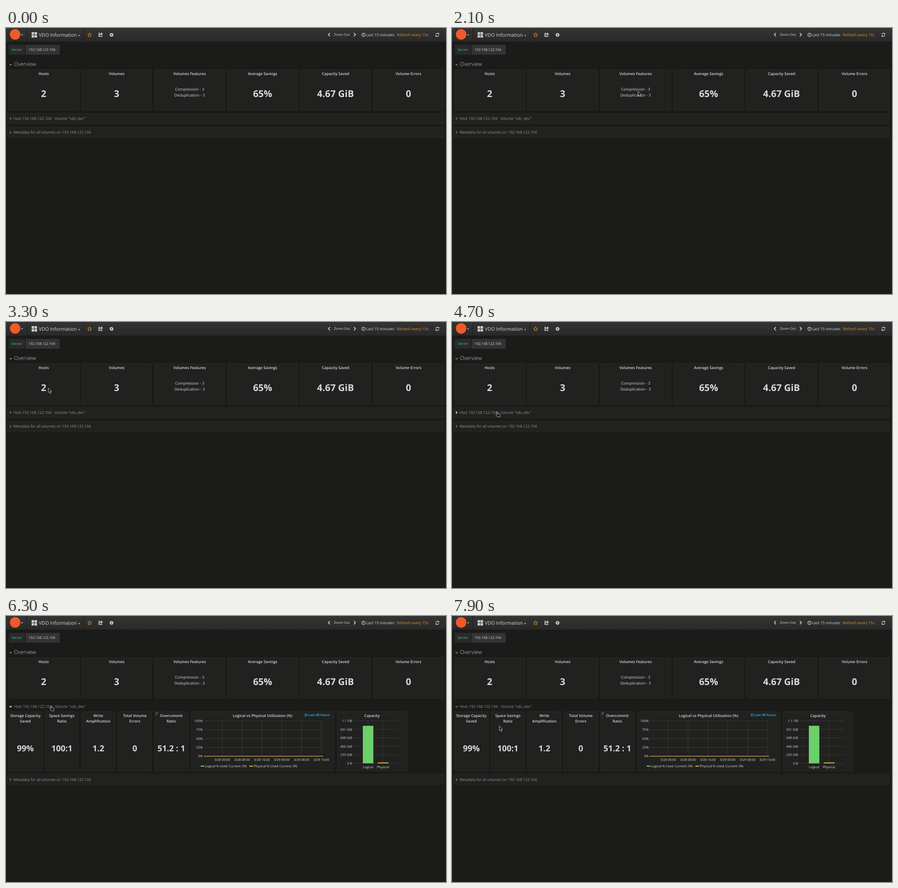
These frames come from a looping animation (963 px wide and 582 px high, 8 s). An HTML page:

```html
<!DOCTYPE html>
<html lang="en">
<head>
<meta charset="utf-8">
<title>VDO Information</title>
<style>
html, body { margin: 0; width: 100%; height: 100%; overflow: hidden; background: #1b1b1a; }
svg { display: block; width: 963px; height: 582px; }
text { font-family: "Open Sans", sans-serif; fill: #d8d9da; text-rendering: geometricPrecision; white-space: pre; }
.panel { fill: #212120; stroke: #2a2a29; }
.title { font-size: 8.26px; font-weight: 600; text-anchor: middle; }
.big { font-weight: 700; text-anchor: middle; }
.row { font-size: 8.35px; font-weight: 300; fill: #d0d0d0; }
.grid { fill: none; stroke: #444442; stroke-width: .7; }
.line { fill: none; stroke: #d8d9da; stroke-width: 1.3; }
.chev { fill: none; stroke: #999; stroke-width: 1.1; }
.cursor { fill: #1b1b1a; stroke: #dcdcdc; stroke-width: .8; stroke-linejoin: round; }

#closed, #opened, #detail, #meta, .hover, #arrow, #hand { animation: 8s step-end infinite; }
#closed { animation-name: closed; }
#opened { animation-name: opened; }
#detail { animation-name: detail; }
#meta { animation-name: meta; }
.hover { animation-name: hover; }
#arrow { animation-name: arrow; }
#hand { animation-name: hand; }
@keyframes closed { 0% { opacity: 1 } 77.5%, 100% { opacity: 0 } }
@keyframes opened { 0% { opacity: 0 } 77.5%, 100% { opacity: 1 } }
@keyframes detail { 0% { opacity: 0 } 78.75%, 100% { opacity: 1 } }
@keyframes meta {
  0% { transform: translateY(0) }
  77.5% { transform: translateY(129px) }
  78.75%, 100% { transform: translateY(129.7px) }
}
@keyframes hover {
  0% { stroke: #999; stroke-width: 1.1 }
  56.25% { stroke: #fff; stroke-width: 1.4 }
  92.5%, 100% { stroke: #999; stroke-width: 1.1 }
}
@keyframes hand {
  0% { opacity: 0; transform: translate(95px, 195px) }
  56.25% { opacity: 1; transform: translate(95px, 195px) }
  58.75% { opacity: 1; transform: translate(95.3px, 195.5px) }
  92.5%, 100% { opacity: 0; transform: translate(95px, 195px) }
}
@keyframes arrow {
  0% { transform: translate(-20px, -20px) }
  6.25% { transform: translate(8px, 11px) }
  7.5% { transform: translate(130px, 95px) }
  8.75% { transform: translate(238px, 169px) }
  11.25% { transform: translate(262px, 165px) }
  12.5% { transform: translate(330px, 150px) }
  13.75% { transform: translate(390px, 140px) }
  15% { transform: translate(406px, 138px) }
  18.75% { transform: translate(406.5px, 137.3px) }
  26.25% { transform: translate(406.5px, 138px) }
  27.5% { transform: translate(405px, 139.5px) }
  30% { transform: translate(393px, 141px) }
  31.25% { transform: translate(353px, 144.5px) }
  33.75% { transform: translate(290px, 152px) }
  35% { transform: translate(218px, 150px) }
  37.5% { transform: translate(150px, 146px) }
  38.75% { transform: translate(103px, 142px) }
  41.25% { transform: translate(92px, 144px) }
  43.75% { transform: translate(92.4px, 144.4px) }
  45% { transform: translate(92.6px, 144.4px) }
  47.5% { transform: translate(93px, 145px) }
  53.75% { transform: translate(93px, 152px) }
  55% { transform: translate(95px, 174px) }
  56.25% { transform: translate(-20px, -20px) }
  92.5% { transform: translate(101px, 213px) }
  93.75% { transform: translate(102px, 231px) }
  95% { transform: translate(103px, 239.6px) }
  98.75%, 100% { transform: translate(103px, 240px) }
}
</style>
</head>
<body>
<svg id="stage" viewBox="0 0 963 582">
  <defs>
    <linearGradient id="bar" x2="0" y2="1">
      <stop offset="0" stop-color="#343434"/><stop offset="1" stop-color="#292929"/>
    </linearGradient>
  </defs>

  <rect width="963" height="29" fill="url(#bar)"/>
  <path d="M0 29.5H963" stroke="#242423"/>
  <path d="M45.5 0V29M170.5 0V29" stroke="#1d1d1d"/>
  <circle cx="20" cy="14" r="11.5" fill="#f05a28"/>
  <path d="M33 14h4.400l-2.200 2.300zM157.800 15.800h4.400l-2.200 2.300zM108 46.800h3.800l-1.900 2z" fill="#d8d9da"/>
  <path d="M56 9h5.500v5.500h-5.500zM62.500 9h5.500v5.500h-5.500zM56 15.500h5.500v5.500h-5.500zM62.500 15.500h5.500v5.500h-5.500z" fill="#c8c8c8"/>
  <text x="71.800" y="18.900" font-size="10.5">VDO Information</text>
  <path id="star" fill="none" stroke="#eb9a2a"/>
  <path class="line" d="M206 11.500h-2.800v7h6.600v-2.500M205 16.500q0-3.500 4-3.500"/>
  <path d="M208 9.800l4 3.200-4 3.200z" fill="#d8d9da"/>
  <circle class="line" cx="231" cy="15" r="2.400" style="stroke-width:1.900"/>
  <circle class="line" cx="231" cy="15" r="3.800" style="stroke-width:1.200" stroke-dasharray="1.500 1.485"/>
  <path class="line" d="M709 11l-3.600 3.600 3.600 3.600M761.300 11l3.600 3.600-3.600 3.600" style="stroke-width:1.600"/>
  <text x="717.700" y="17.200" font-size="7.45">Zoom Out</text>
  <circle class="line" cx="782.300" cy="15" r="3.600" style="stroke-width:1.100"/>
  <path class="line" d="M782.600 12.700v2.600h-1.800" style="stroke-width:.8"/>
  <text x="788" y="18.100" font-size="8.43">Last 15 minutes</text>
  <text x="855.500" y="18.100" font-size="8.43" style="fill:#eb8f24">Refresh every 15s</text>
  <path class="line" d="M940.600 14.200a3.500 3.500 0 0 1 6-1.700M947.400 15.800a3.500 3.500 0 0 1-6 1.700"/>
  <path d="M948 10.800v3.300h-3.300zM940 19.200v-3.300h3.300z" fill="#d8d9da"/>

  <rect x="6" y="37" width="35.500" height="21.500" fill="#2a2a2a"/>
  <rect x="43" y="37" width="74.500" height="21.500" fill="#333"/>
  <text x="12.500" y="50.400" font-size="7.5" style="fill:#33c6b6">Server</text>
  <text x="49.500" y="50.400" font-size="7.6">192.168.122.104</text>

  <path class="chev" d="M7.700 79l2.500 2.500 2.500-2.500"/>
  <text x="17.500" y="82.700" font-size="11.7" font-weight="300">Overview</text>
  <g id="overview"></g>

  <g id="closed">
    <rect class="panel" x="3.500" y="187" width="954" height="22"/>
    <path class="chev hover" d="M8.500 195.500l2.500 2.600-2.500 2.600"/>
    <text class="row" x="16.300" y="201.100">Host 192.168.122.104 - Volume "vdo_dev"</text>
  </g>
  <g id="opened">
    <path class="chev hover" d="M7.700 197l2.500 2.500 2.500-2.500"/>
    <text class="row" x="17.300" y="200.500">Host 192.168.122.104 - Volume "vdo_dev"</text>
  </g>
  <g id="detail"></g>
  <g id="meta">
    <rect class="panel" x="3.500" y="217" width="954" height="22"/>
    <path class="chev" d="M8.500 225.700l2.500 2.600-2.500 2.600"/>
    <text class="row" x="16.300" y="231.300">Metadata for all volumes on 192.168.122.104</text>
  </g>

  <path id="arrow" class="cursor" d="M.5 .5V10.400L2.900 8.500 4.700 12.500 6.600 11.700 4.900 7.800H7.800Z"/>
  <path id="hand" class="cursor" d="M3 7V2Q3 .8 4 .8T5 2V5.200L9.200 5.800Q10.500 6.200 10.400 7.500L9.500 12H4L1 8Q.6 6.500 2 6.600Z"/>
</svg>
<script>
const $ = id => document.getElementById(id);
const text = (x, y, s, attrs = '') => `<text x="${x}" y="${y}" ${attrs}>${s}</text>`;
const panel = (x, y, w, h) => `<rect class="panel" x="${x + .5}" y="${y + .5}" width="${w - 1}" height="${h - 1}"/>`;
const title = (x, y, s) => text(x, y, s, 'class="title"');
const big = (x, y, s, size) => text(x, y, s, `class="big" font-size="${size}"`);
const small = (x, y, s, anchor = 'start', size = 7.1) =>
  text(x, y, s, `font-size="${size}" text-anchor="${anchor}"`);
const grid = d => `<path class="grid" d="${d}"/>`;
const bar = (x, y, w, h, color) => `<rect x="${x}" y="${y}" width="${w}" height="${h}" fill="${color}"/>`;
const GREEN = '#6ccf69', YELLOW = '#e3b52f', BLUE = '#33b5e5';

$('star').setAttribute('d', 'M' + Array.from({ length: 10 }, (_, i) => {
  const a = i * Math.PI / 5, r = i % 2 ? 2.2 : 4.6;
  return `${183 + r * Math.sin(a)} ${15.2 - r * Math.cos(a)}`;
}).join('L') + 'Z');

$('overview').innerHTML = [
  ['Hosts', '2'], ['Volumes', '3'], ['Volumes Features'],
  ['Average Savings', '65%'], ['Capacity Saved', '4.67 GiB'], ['Volume Errors', '0']
].map(([name, value], i) => {
  const x = 5.6 + i * 159.7, mid = x + 76.8;
  const body = value ? big(mid, 150.5, value, 20.4)
    : small(mid, 137.2, 'Compression - 3', 'middle', 8.45) + small(mid, 149.7, 'Deduplication - 3', 'middle', 8.45);
  return panel(Math.round(x), 91, 154, 89) + title(mid, 103, name) + body;
}).join('');

const stats = [
  ['Storage Capacity', 'Saved', '99%'], ['Space Savings', 'Ratio', '100:1'],
  ['Write', 'Amplification', '1.2'], ['Total Volume', 'Errors', '0'],
  ['Overcommit', 'Ratio', '51.2 : 1']
].map(([a, b, value], i) => {
  const x = 5.6 + i * 79.85, mid = x + 36.8;
  return panel(Math.round(x), 209, 74, 130) + title(mid, 220.6, a) + title(mid, 233.1, b) + big(mid, 295.5, value, 18);
}).join('') + '<path d="M326 209h11l-11 11z" fill="#303030"/>' +
  text(329.2, 216, 'i', 'font-size="6.5" font-weight="600"');

function usageChart() {
  let out = panel(405, 209, 313, 130) + title(561.6, 220.6, 'Logical vs Physical Utilization (%)');
  ['100%', '75%', '50%', '25%', '0%'].forEach((s, i) => {
    const y = 229.5 + i * 19.35;
    out += grid(`M433 ${y}H694`) + small(430.3, y + 2.5, s, 'end');
  });
  ['3/28 00:00', '3/28 08:00', '3/28 16:00', '3/29 00:00', '3/29 08:00', '3/29 16:00'].forEach((s, i) => {
    const x = 473.2 + i * 43.4;
    out += grid(`M${x} 229.5V307`) + small(x, 317.2, s, 'middle', 7);
  });
  return out + bar(433, 306.1, 261, 1.2, YELLOW) +
    bar(426, 327.4, 8, 2.2, GREEN) + small(435.2, 330.9, 'Logical % Used', 'start', 7.18) +
    small(487.6, 330.9, 'Current: 0%', 'start', 7.18) +
    bar(532.5, 327.4, 8, 2.2, YELLOW) + small(542.2, 330.9, 'Physical % Used', 'start', 7.18) +
    small(598.3, 330.9, 'Current: 0%', 'start', 7.18) +
    `<g fill="none" stroke="${BLUE}"><circle cx="656.6" cy="216.600" r="2.700"/><path d="M656.700 215v1.800h-1.300" stroke-width=".7"/></g>` +
    text(661.2, 219.3, 'Last 48 hours', `font-size="7.35" font-weight="600" style="fill:${BLUE}"`);
}

function capacityChart() {
  let out = panel(725, 209, 153, 130) + title(801, 220.6, 'Capacity');
  ['1.1 TiB', '931 GiB', '698 GiB', '466 GiB', '233 GiB', '0 B'].forEach((s, i) => {
    const y = 229.5 + i * 18.55;
    out += grid(`M760 ${y}H858`) + small(757.3, y + 2.5, s, 'end');
  });
  return out + grid('M792.500 229.500V322.300M825 229.500V322.300') +
    bar(781, 240.2, 23, 82.2, GREEN) + bar(813.7, 320.4, 23.3, 2, YELLOW) +
    small(792.4, 332.7, 'Logical', 'middle') + small(825, 332.7, 'Physical', 'middle');
}

$('detail').innerHTML = stats + usageChart() + capacityChart();
</script>
</body>
</html>
```
